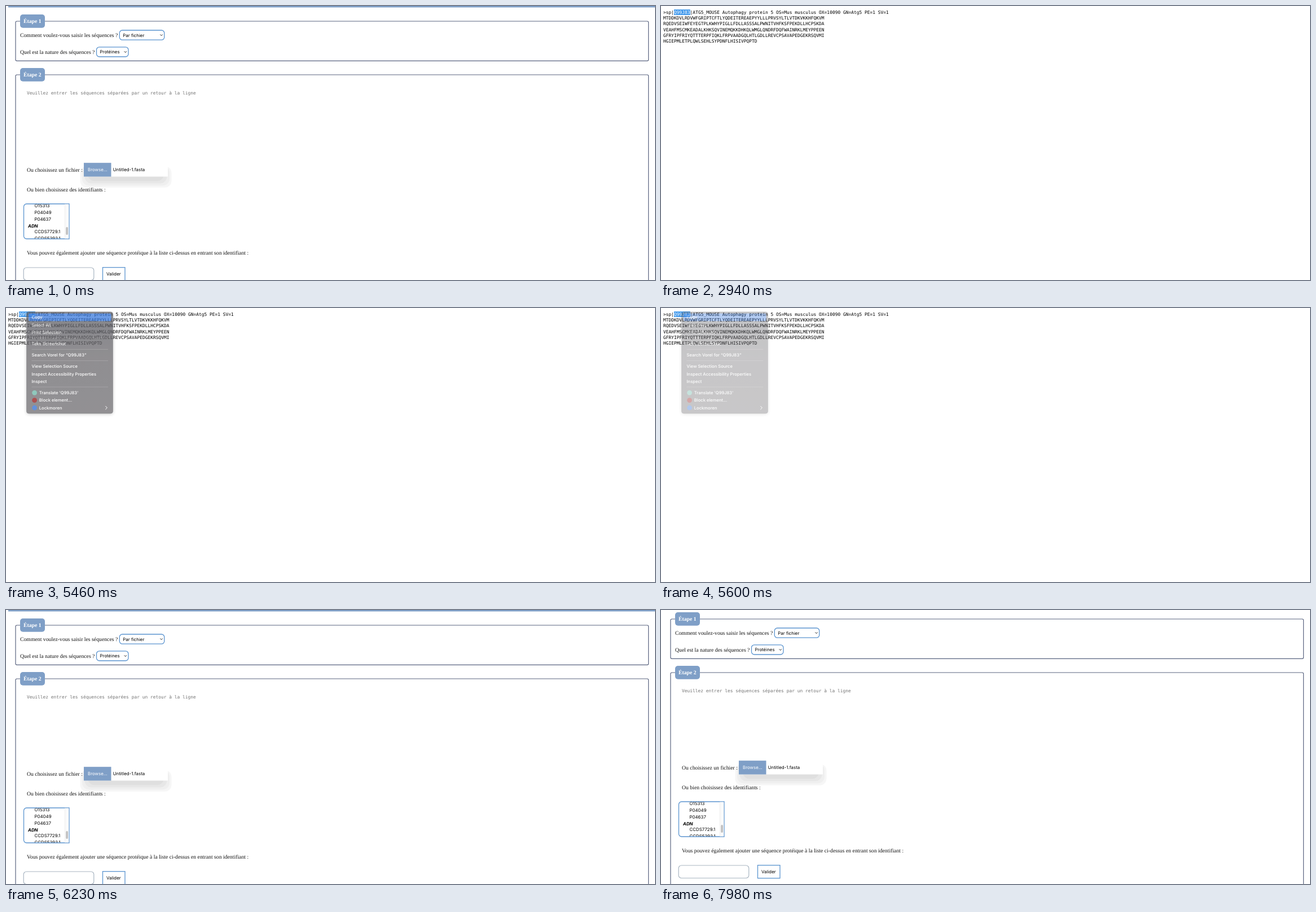
An HTML page that plays this animation: 1151 by 486 pixels, repeating every 8000 ms.

```html
<!DOCTYPE html>
<html lang="fr">
<head>
<meta charset="utf-8">
<title>Séquences</title>
<style>
  html, body { margin: 0; width: 100%; height: 100%; overflow: hidden; background: #fff; }
  svg { display: block; width: 1151px; height: 486px; }
  text { white-space: pre; text-rendering: geometricPrecision; }
  .serif { font: 9.74px "Liberation Serif", serif; fill: #111; }
  .legend { font: bold 9.74px "Liberation Serif", serif; fill: #fff; }
  .ui { font: 7.9px Inter, sans-serif; fill: #000; }
  .group { font: italic bold 7.9px Inter, sans-serif; fill: #000; }
  .menu { font: 500 7.6px Inter, sans-serif; fill: #fff; }
  .mono { font: 7.915px "DejaVu Sans Mono", monospace; fill: #000; }
  .white { fill: #fff; }
  .hint { fill: #757575; }
  .frame { fill: none; stroke: #5a6480; stroke-width: 1.2; }
  .control { fill: #fff; stroke: #5b94cf; stroke-width: 1.3; }
  .chevron { fill: none; stroke: #222; stroke-width: 1; stroke-linecap: round; }
</style>
</head>
<body>
<svg viewBox="0 0 1151 486">
  <defs>
    <linearGradient id="glass" x1="0" y1="0" x2="0" y2="1">
      <stop offset="0" stop-color="#5a5b62"/>
      <stop offset=".45" stop-color="#69676b"/>
      <stop offset="1" stop-color="#6c6a6e"/>
    </linearGradient>
    <filter id="blur" x="-20%" y="-20%" width="140%" height="140%">
      <feGaussianBlur stdDeviation="3"/>
    </filter>
    <clipPath id="listClip"><rect x="32.5" y="351.6" width="79" height="61"/></clipPath>
  </defs>
  <g id="form"></g>
  <g id="fasta"></g>
  <g id="menu"></g>
</svg>
<script>
const BLUE = '#7f9fc7';
const $ = id => document.getElementById(id);
const text = (cls, x, y, str) => `<text class="${cls}" x="${x}" y="${y}">${str}</text>`;
const rect = (x, y, w, h, r, attrs) =>
  `<rect x="${x}" y="${y}" width="${w}" height="${h}" rx="${r}" ${attrs}/>`;
const fill = color => `fill="${color}"`;

const fieldset = (y, height, title) =>
  rect(17, y, 1122.5, height, 2.4, 'class="frame"') +
  rect(25, y - 12, 44, 23.7, 5, fill(BLUE)) +
  text('legend', 31, y + 3, title);

const select = (x, y, width, label) =>
  rect(x, y, width, 17.2, 5, 'class="control"') +
  text('ui', x + 6, y + 11.5, label) +
  `<path class="chevron" d="M${x + width - 7} ${y + 7.8}l1.8 1.9l1.8-1.9"/>`;

function drawForm() {
  const shadow = [
    [131.5, 322, '#f6f6f6'], [135, 318.5, '#efefef'],
    [139.5, 314.5, '#e7e7e7'], [145, 310.5, '#dfdfdf']
  ].map(([x, bottom, color]) =>
    rect(x, 284, 425 - 2 * x, bottom - 284, 12, fill(color))).join('');

  const list = [['ui', 'O15313', 357.3], ['ui', 'P04049', 369.3], ['ui', 'P04637', 381.4],
    ['group', 'ADN', 392.5], ['ui', 'CCDS7729.1', 403.4], ['ui', 'CCDS5393.1', 415.4]
  ].map(([cls, label, y]) => text(cls, cls === 'group' ? 39 : 50.5, y, label)).join('');

  $('form').innerHTML =
    rect(4, -3, 1147, 5.5, 0, fill(BLUE)) +
    fieldset(27, 70.3, 'Étape 1') +
    text('serif', 25, 54.8, 'Comment voulez-vous saisir les séquences ?') +
    select(201.3, 43, 79.5, 'Par fichier') +
    text('serif', 25, 84.6, 'Quel est la nature des séquences ?') +
    select(160.5, 72.8, 56.5, 'Protéines') +
    fieldset(122, 420, 'Étape 2') +
    text('mono hint', 37, 157.3, 'Veuillez entrer les séquences séparées par un retour à la ligne') +
    shadow +
    text('serif', 37, 293.5, 'Ou choisissez un fichier :') +
    rect(138, 278.2, 149, 24.4, 0, fill('#fff')) +
    rect(138, 278.2, 48.5, 24.4, 0, fill(BLUE)) +
    text('ui white', 145, 293.3, 'Browse…') +
    text('ui', 189.7, 293.3, 'Untitled-1.fasta') +
    text('serif', 37, 328.5, 'Ou bien choisissez des identifiants :') +
    '<path class="control" d="M112 351H36.500a5 5 0 0 0-5 5V408a5 5 0 0 0 5 5H112Z"/>' +
    `<g clip-path="url(#listClip)">${list}` +
    rect(104.3, 351, 7.2, 62, 0, fill('#fafafa')) +
    rect(104.3, 351, .6, 62, 0, fill('#e6e6e6')) +
    rect(106.2, 392, 3.8, 14, 1.9, fill('#c1c1c1')) + '</g>' +
    text('serif', 37, 441, 'Vous pouvez également ajouter une séquence protéique à la liste ci-dessus en entrant son identifiant :') +
    rect(31.2, 464, 124.6, 22.5, 5, 'fill="#fff" stroke="#a9b6c2" stroke-width="1.2"') +
    rect(171.5, 463.7, 39.5, 23, 0, 'class="control"') +
    text('ui', 178, 478, 'Valider');
}

function drawFasta() {
  const lines = [
    '&gt;sp|<tspan fill="#fff">Q99J83</tspan>|ATG5_MOUSE Autophagy protein 5 OS=Mus musculus OX=10090 GN=Atg5 PE=1 SV=1',
    'MTDDKDVLRDVWFGRIPTCFTLYQDEITEREAEPYYLLLPRVSYLTLVTDKVKKHFQKVM',
    'RQEDVSEIWFEYEGTPLKWHYPIGLLFDLLASSSALPWNITVHFKSFPEKDLLHCPSKDA',
    'VEAHFMSCMKEADALKHKSQVINEMQKKDHKQLWMGLQNDRFDQFWAINRKLMEYPPEEN',
    'GFRYIPFRIYQTTTERPFIQKLFRPVAADGQLHTLGDLLREVCPSAVAPEDGEKRSQVMI',
    'HGIEPMLETPLQWLSEHLSYPDNFLHISIVPQPTD'
  ];
  $('fasta').innerHTML = rect(23, 6.2, 28.8, 9.8, 0, fill('#3f98ec')) +
    lines.map((line, i) => text('mono', 4, 13.6 + i * 10.3, line)).join('');
}

function drawMenu() {
  const items = [
    [16.5, 'Copy'], [30, 'Select All'], [43.4, 'Print Selection'], [63.5, 'Take Screenshot'],
    [83.5, 'Search Vorel for “Q99J83”'], [103.6, 'View Selection Source'],
    [117, 'Inspect Accessibility Properties'], [130.3, 'Inspect'],
    [150.3, 'Translate \'Q99J83\'', '#68b5a5'], [163.6, 'Block element…', '#8f1414'],
    [177, 'Lockmoren', '#2d6bd0']
  ];
  $('menu').innerHTML =
    rect(36.5, 9, 153, 179, 4, 'fill="#000" opacity=".3" filter="url(#blur)"') +
    rect(36.5, 7, 153, 180, 4, 'fill="url(#glass)" stroke="#5c5b60" stroke-width=".6"') +
    rect(40, 9.8, 146.5, 13.4, 2.5, 'id="hover" fill="#3778dc"') +
    [53.2, 73.2, 93.3, 140].map(y => rect(45.5, y - .3, 135.5, .7, 0, fill('#8f8d91'))).join('') +
    items.map(([y, label, icon]) =>
      (icon ? `<circle cx="50.600" cy="${y}" r="4.400" fill="${icon}"/>` : '') +
      text('menu', icon ? 58.8 : 45.5, y + 2.7, label)).join('') +
    '<path class="chevron" style="stroke:#fff" d="M176.600 174.200l2.800 2.800l-2.800 2.800"/>';
}

const show = (id, visible) => $(id).setAttribute('visibility', visible ? 'visible' : 'hidden');

function render(t) {
  const step = Math.floor(t / 70) * 70;
  const onFasta = t >= 2940 && t < 6230;
  const menuOpen = t >= 4830 && t < 5740;
  const scroll = t >= 7980 ? 11 : t >= 7910 ? 4 : 0;
  const selectAll = t >= 5040 && t < 5180;

  show('form', !onFasta);
  show('fasta', onFasta);
  show('menu', menuOpen);
  show('hover', menuOpen && t >= 4900);
  $('form').setAttribute('transform', `translate(0 ${-scroll})`);
  $('hover').setAttribute('y', selectAll ? 23.3 : 9.8);
  $('menu').setAttribute('opacity', Math.max(0, Math.min(1, 1 - (step - 5360) / 380)));
}

drawForm();
drawFasta();
drawMenu();
const start = performance.now();
function tick() {
  render((performance.now() - start) % 8000);
  requestAnimationFrame(tick);
}
tick();
</script>
</body>
</html>
```
